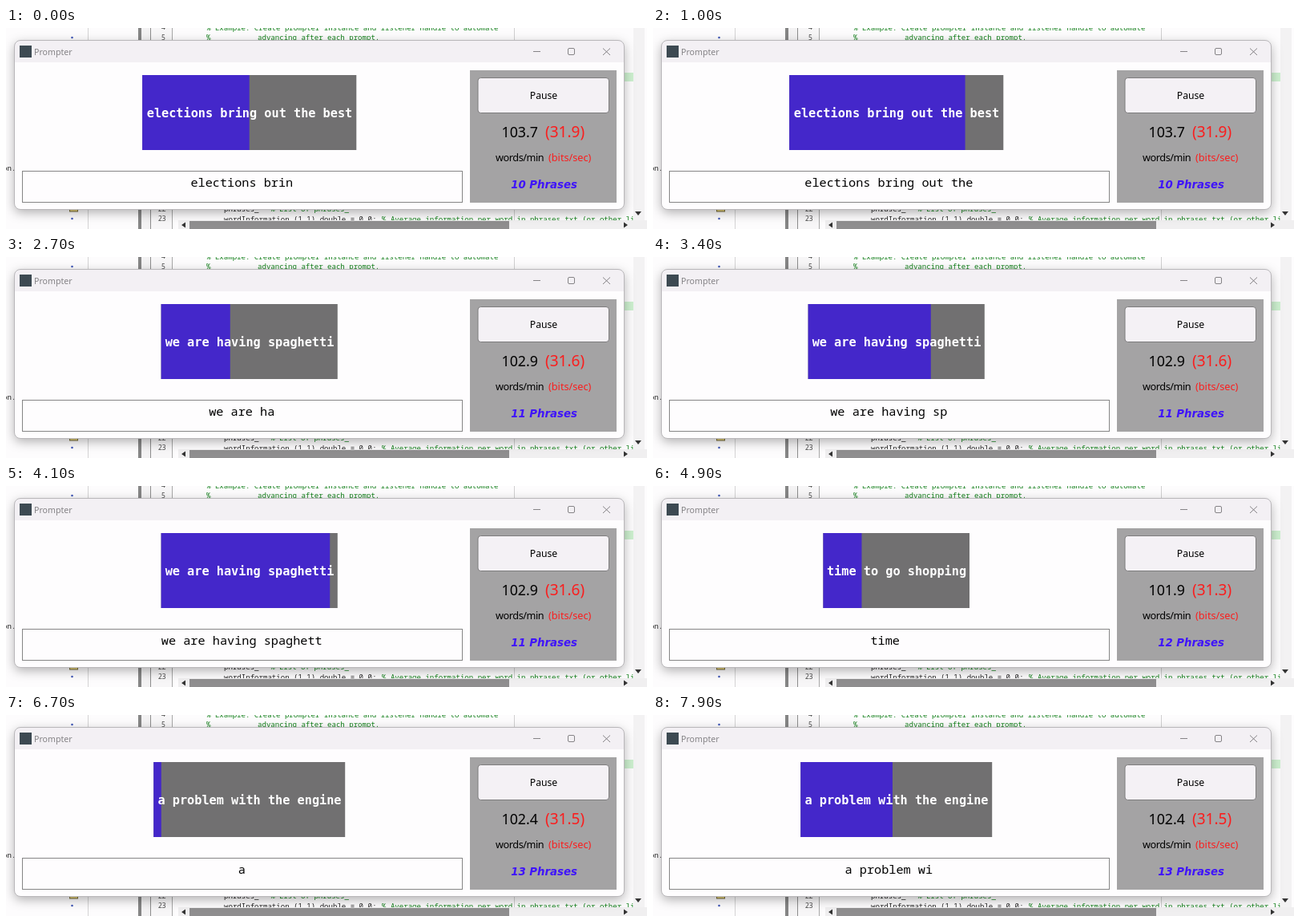
An HTML page for the animation above (8 s loop, 800x252 px).

```html
<!DOCTYPE html>
<html lang="en">
<head>
<meta charset="utf-8">
<title>Prompter</title>
<style>
html, body { margin: 0; width: 100%; height: 100%; overflow: hidden; background: #fdfcfd; }
svg { display: block; width: 800px; height: 252px; }
svg { font-family: "Noto Sans", "Open Sans", sans-serif; }
.mono { font-family: "Noto Sans Mono", "DejaVu Sans Mono", monospace; font-size: 15.23px; text-anchor: middle; white-space: pre; }
.bold { font-family: "DejaVu Sans Mono", "Noto Sans Mono", monospace; font-weight: 700; fill: #fff; }
.code { font-family: "Noto Sans Mono", "DejaVu Sans Mono", monospace; font-size: 9.07px; fill: #222; }
.note { fill: #12801a; }
.num { font-size: 8.4px; fill: #444; }
.mid { text-anchor: middle; }
.unit { font-size: 12.7px; }
.red { fill: #fb1d1d; }
.line { fill: none; stroke: #858386; }
.shadow { filter: drop-shadow(0 4px 7px rgba(0, 0, 0, .3)); }
.count { font: italic 700 13.3px "DejaVu Sans", "Noto Sans", sans-serif; fill: #3f14fa; }
</style>
</head>
<body>
<svg viewBox="0 0 800 252">
  <!-- editor behind the window -->
  <rect width="800" height="252" fill="#fdfcfd"/>
  <rect x="102" width="1" height="252" fill="#d4d4d4"/>
  <rect x="165" width="16" height="252" fill="#f3f2f3"/>
  <rect x="165" width="4" height="252" fill="#858585"/>
  <rect x="180" width="1" height="252" fill="#8c8c8c"/>
  <rect x="181" width="26" height="252" fill="#f7f6f7"/>
  <rect x="207" width="1" height="252" fill="#a8a8a8"/>
  <rect x="634" width="1" height="241" fill="#d0d0d0"/>
  <circle cx="82.5" cy="12" r="1.3" fill="#4058b8"/>
  <circle cx="82.5" cy="239" r="1.3" fill="#4058b8"/>
  <rect x="79.5" y="222.5" width="10" height="7.5" fill="#e6d27a" stroke="#776c3c"/>
  <g class="code">
    <text x="-4" y="178.5">on.</text>
    <text class="note" x="250" y="2.5">% Example: Create prompter instance and listener handle to automate</text>
    <text class="note" x="250" y="15">%</text>
    <text class="note" x="314" y="15">advancing after each prompt.</text>
    <text x="272" y="229.5">phrases_ <tspan class="note" x="330">% List of phrases_</tspan></text>
    <text x="272" y="242.5">wordInformation_(1,1) double = 0.0; <tspan class="note" x="469">% Average information per word in phrases.txt (or other li</tspan></text>
  </g>
  <g class="num">
    <text x="194" y="2">4</text>
    <text x="194" y="14.5">5</text>
    <text x="190" y="229.5">22</text>
    <text x="190" y="242">23</text>
  </g>
  <rect x="770" y="56" width="13" height="11" fill="#cdf0cf"/>
  <rect x="783" width="14" height="241" fill="#f3f2f3"/>
  <path d="M785 230h8l-4 5z" fill="#333"/>
  <rect x="215" y="241" width="585" height="11" fill="#f0eff0"/>
  <rect x="229" y="242" width="399" height="10" fill="#8f8e8f"/>
  <path d="M224 243.500v7l-5-3.500zM771 243.500v7l5-3.500z" fill="#333"/>

  <!-- window -->
  <rect class="shadow" x="10.500" y="15.500" width="761" height="212" rx="7.500" fill="#fefdfe"/>
  <path d="M10.500 43V23a7.500 7.500 0 0 1 7.500-7.500H764a7.500 7.500 0 0 1 7.500 7.500V43z" fill="#f3f0f4"/>
  <rect x="10.500" y="15.500" width="761" height="212" rx="7.500" fill="none" stroke="#b9b7ba"/>
  <rect x="17" y="22" width="15" height="15" fill="#3d4a52"/>
  <text x="35" y="34" font-size="10.600" fill="#858386">Prompter</text>
  <path class="line" d="M658 29.500h9M745 25.500l9 8.500M754 25.500l-9 8.500"/>
  <rect class="line" x="701.500" y="25.500" width="8" height="8" rx="1.500"/>

  <!-- prompt and typed text -->
  <rect id="box" y="59" height="94" fill="#717071"/>
  <rect id="fill" y="59" height="94" fill="#4427ca"/>
  <text id="phrase" class="mono bold" x="304" y="112"></text>
  <rect x="20.500" y="179.500" width="549" height="39" fill="#fefdfe" stroke="#858585"/>
  <text id="typed" class="mono" x="294.300" y="199"></text>

  <!-- score panel -->
  <rect x="579" y="53" width="183" height="166" fill="#a4a3a4"/>
  <rect x="589" y="62.500" width="163.500" height="44" rx="3.500" fill="#f4f1f5" stroke="#7d7c7d"/>
  <text class="mid" x="671" y="89" font-size="12.200">Pause</text>
  <text id="speed" x="618.500" y="137" font-size="17.800"></text>
  <text id="bits" class="red" x="673" y="137" font-size="19"></text>
  <text class="unit" x="611" y="166.500" letter-spacing="-.45">words/min</text>
  <text class="unit red" x="677" y="166.500">(bits/sec)</text>
  <text id="count" class="mid count" x="671.500" y="200.500"></text>
</svg>
<script>
// KEY: time per keystroke; LAG: how far the typed line trails the bar
const LOOP = 8000, STEP = 100, KEY = 107, LAG = 20, CENTER = 303.7;

const rounds = [
  { start: -1540, text: "elections bring out the best", speed: "103.7", bits: "31.9", count: 10 },
  { start: 1665, text: "we are having spaghetti", speed: "102.9", bits: "31.6", count: 11 },
  { start: 4300, text: "time to go shopping", speed: "101.9", bits: "31.3", count: 12 },
  { start: 6540, text: "a problem with the engine", speed: "102.4", bits: "31.5", count: 13 }
];

const el = id => document.getElementById(id);
const put = (id, text) => { el(id).textContent = text; };
const keysAt = ms => Math.max(0, Math.floor(ms / KEY));

function bar(id, x, width) {
  el(id).setAttribute("x", x);
  el(id).setAttribute("width", width);
}

function draw(t) {
  const round = rounds.filter(r => r.start <= t).pop();
  const { text, start } = round;
  const done = Math.min(1, keysAt(t - start) / text.length);
  const width = 9.4 * text.length + 4;
  const left = CENTER - width / 2;

  bar("box", left, width);
  bar("fill", left, width * done);
  put("phrase", text);
  put("typed", text.slice(0, keysAt(t - start - LAG)));
  put("speed", round.speed);
  put("bits", `(${round.bits})`);
  put("count", `${round.count} Phrases`);
}

const begin = performance.now();
let last = -1;

function tick() {
  const t = Math.floor((performance.now() - begin) % LOOP / STEP) * STEP;
  if (t !== last) draw(last = t);
  requestAnimationFrame(tick);
}
tick();
</script>
</body>
</html>
```
